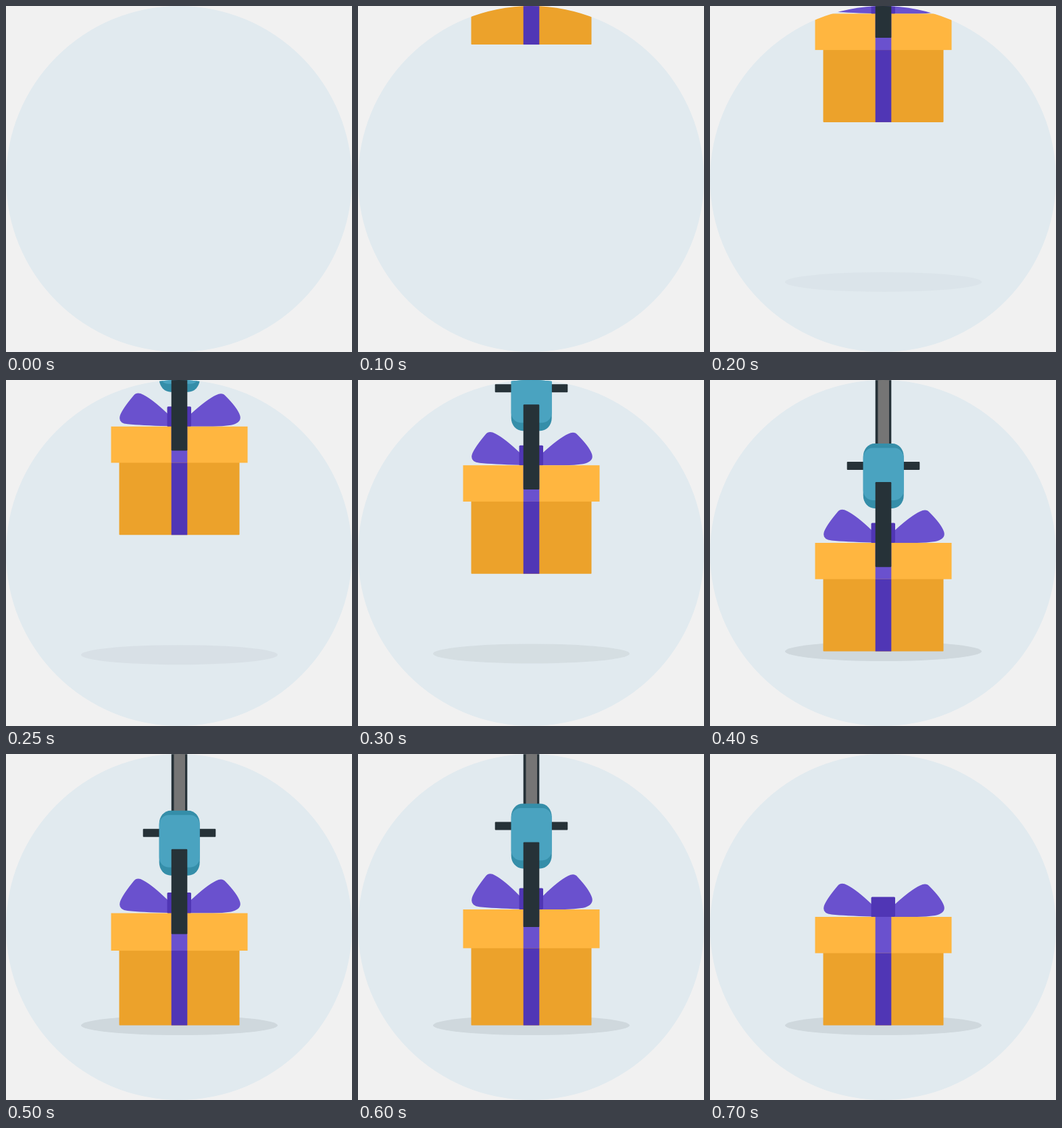
These frames come from a looping animation (512x512 px, 800 ms). An HTML page:

```html
<!DOCTYPE html>
<html lang="en">
<head>
<meta charset="utf-8">
<title>Gift delivery</title>
<style>
  html, body { margin: 0; height: 100%; overflow: hidden; background: #f1f1f1; }
  svg { display: block; width: 100%; height: 100%; }
</style>
</head>
<body>
<svg viewBox="0 0 512 512">
  <clipPath id="disc"><circle cx="256" cy="256" r="256"/></clipPath>
  <circle cx="256" cy="256" r="256" fill="#e1eaef"/>
  <g clip-path="url(#disc)">
    <ellipse id="shadow" cx="256.5" cy="401.5" rx="145.5" ry="14.5" fill="#cfd8dd"/>
    <g id="gift">
      <path fill="#6a51ce" d="M239 222Q217 201 203 194Q194 189 189 195Q173 214 169 224Q165 236 180 237.5Q200 239.5 239 240.5Z
        M274 222Q297 201 311 194.5Q320 190 325 196Q342 213 346 224Q350 235 333 239Q320 241 306 241H274Z"/>
      <rect x="238.5" y="211.5" width="35.5" height="30" rx="1.5" fill="#5036b5"/>
      <rect x="167.5" y="290" width="178" height="111.5" rx=".8" fill="#eca22b"/>
      <rect x="155.5" y="241" width="202" height="53.7" fill="#ffb640"/>
      <rect x="244.7" y="241" width="23.6" height="53.7" fill="#6a51ce"/>
      <rect x="244.7" y="294.7" width="23.6" height="106.8" fill="#5036b5"/>
    </g>
    <g id="claw" fill="#263238">
      <rect x="244.7" y="-300" width="23.6" height="400"/>
      <rect x="248.5" y="-300" width="16.5" height="400" fill="#757575"/>
      <rect x="202.7" y="121" width="107.6" height="12" rx="1"/>
      <rect x="226.7" y="94" width="60" height="96" rx="17" ry="19" fill="#358ea9"/>
      <rect x="226.7" y="100.5" width="60" height="77.5" rx="14" ry="15" fill="#4aa3c0"/>
      <rect x="244.7" y="151" width="23.6" height="125.7" rx="1.2"/>
    </g>
  </g>
</svg>
<script>
const [shadow, gift, claw] = ["shadow", "gift", "claw"].map(id => document.getElementById(id));
const floorY = 401.5;

function draw(now) {
  const t = now % 800;
  const step = t < 400 ? 50 : 100;
  const time = Math.floor(t / step) * step;
  const left = Math.max(0, 400 - time) / 100;              // remaining part of the drop
  const pull = time < 700 ? Math.max(0, time - 400) / 200 : 0;
  const drop = -114.8 * left;
  const stretch = 1 + 0.0685 * pull;

  gift.style.display = time < 100 ? "none" : "";
  claw.style.display = time < 100 || time >= 700 ? "none" : "";
  gift.setAttribute("transform", `translate(0 ${floorY + drop}) scale(1 ${stretch}) translate(0 ${-floorY})`);
  claw.setAttribute("transform", `translate(0 ${drop - 20.6 * pull})`);
  shadow.setAttribute("transform", `translate(0 ${3.45 * left})`);
  shadow.setAttribute("opacity", Math.max(0, 1 - left / 3));
}

const start = performance.now();
function loop() {
  draw(performance.now() - start);
  requestAnimationFrame(loop);
}
loop();
</script>
</body>
</html>
```
